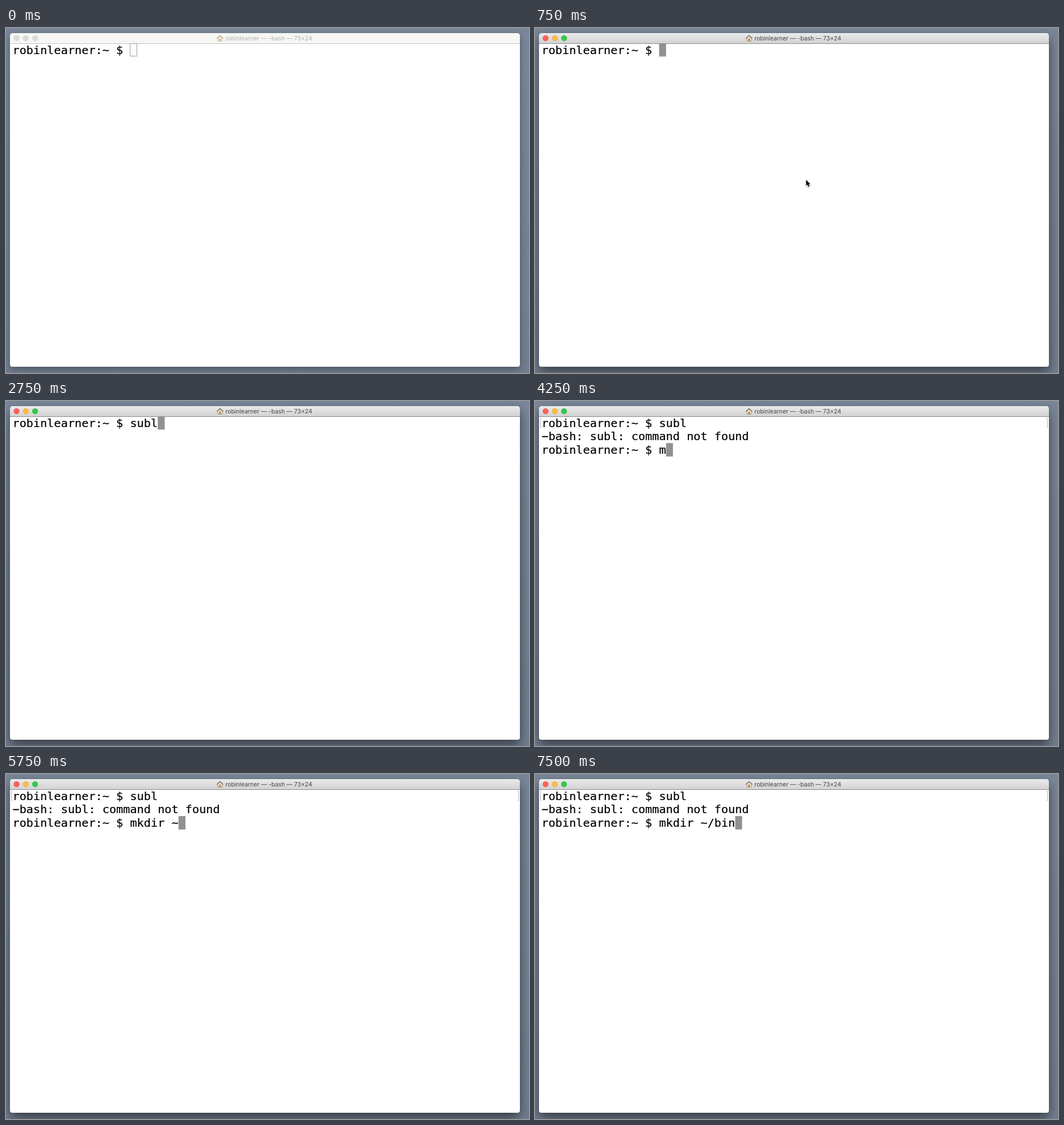
Recreate the animation shown at these times as an HTML page. Size 921 px wide and 608 px high, loop 8000 ms.

```html
<!DOCTYPE html>
<html lang="en">
<head>
<meta charset="utf-8">
<title>Terminal session</title>
<style>
  html, body { margin: 0; width: 100%; height: 100%; overflow: hidden; }
  body { background: linear-gradient(#7a8799, #727e90); }
  #stage { position: relative; width: 921px; height: 608px; overflow: hidden; }
  #window {
    position: absolute; left: 7px; top: 9px; width: 898px; height: 588px;
    border-radius: 5px 5px 4px 4px; background: #fff;
    box-shadow: 0 0 1px rgba(0, 0, 0, .4), 0 9px 20px rgba(0, 0, 0, .52);
  }
  #bar {
    height: 18px; border-bottom: 1px solid #8c8c8c; border-radius: 5px 5px 0 0;
    background: linear-gradient(#f2f2f2, #e8e8e8 10%, #d2d2d2);
  }
  svg { position: absolute; left: 0; top: 0; }
  #title { font: 10.4px Inter, "Liberation Sans", sans-serif; fill: #454545; }
  #screen text {
    font: 20.23px "DejaVu Sans Mono", monospace; white-space: pre;
    fill: #000; stroke: #000; stroke-width: .2px;
  }
  #caret { fill: #919191; }
  #brackets { fill: none; stroke: #b5b5b5; }

  .inactive #window { box-shadow: 0 0 1px rgba(0, 0, 0, .35), 0 5px 13px rgba(0, 0, 0, .33); }
  .inactive #bar { background: #f6f6f3; border-color: #c4c4c4; }
  .inactive #lights circle { fill: #dbdbdb; stroke: #cfcfcf; }
  .inactive #title { fill: #b1b1b1; }
  .inactive #house { opacity: .55; }
  .inactive #caret { fill: #fff; stroke: #9c9c9c; }
</style>
</head>
<body>
<div id="stage" class="inactive">
  <div id="window"><div id="bar"></div></div>
  <svg width="921" height="608" viewBox="0 0 921 608">
    <g id="lights" stroke-width=".6">
      <circle cx="18.6" cy="18" r="4.8" fill="#fc605b" stroke="#df4844"/>
      <circle cx="34.9" cy="18" r="4.8" fill="#fdbd41" stroke="#dea036"/>
      <circle cx="51.2" cy="18" r="4.8" fill="#34c84a" stroke="#27aa35"/>
    </g>
    <g id="house">
      <path d="M373 18L377 14.5 381 18V23.2H373Z" fill="#f0e6d3" stroke="#8f8577" stroke-width=".8"/>
      <path d="M371.3 18.5L377 13.2 382.7 18.5" fill="none" stroke="#807468" stroke-width="1.4"/>
      <path d="M375.6 18.6h2.8v4.4h-2.8z" fill="#b9782f"/>
    </g>
    <text id="title" x="386.5" y="22"></text>
    <g id="screen">
      <rect id="caret"/>
      <text x="11.5" y="45.7"></text>
      <text x="11.5" y="69.3"></text>
      <text x="11.5" y="92.9"></text>
      <path id="brackets" d="M11.5 30.5H9.5V46.5H11.5M900.5 30.5H902.5V46.5H900.5"/>
    </g>
    <g id="pointer" style="filter: drop-shadow(0 1px 1px rgba(0,0,0,.35))">
      <path d="M0 0V10.6L2.4 8.4 4 12.2 5.9 11.4 4.3 7.7H7.5Z" stroke="#fff" stroke-width="1.6"
            stroke-linejoin="round" paint-order="stroke"/>
    </g>
  </svg>
</div>
<script>
  const LOOP = 8000, CELL = 12.18, ROW = 23.6;
  const USER = 'robinlearner';
  const PROMPT = USER + ':~ $ ';
  const ACTIVE_AT = 750, RETURN_AT = 3250;

  // Each entry: time in ms, text typed so far on the line
  const FIRST = [[1750, 's'], [2000, 'su'], [2250, 'sub'], [2750, 'subl']];
  const SECOND = [
    [4250, 'm'], [4500, 'mk'], [4750, 'mkd'], [5000, 'mkdi'], [5250, 'mkdir '],
    [5750, 'mkdir ~'], [6750, 'mkdir ~/'], [7000, 'mkdir ~/bi'], [7250, 'mkdir ~/bin']
  ];

  const el = id => document.getElementById(id);
  const stage = el('stage'), caret = el('caret'), pointer = el('pointer');
  const rows = [...document.querySelectorAll('#screen text')];
  const show = (node, on) => node.setAttribute('visibility', on ? 'visible' : 'hidden');
  const typed = (keys, t) => keys.reduce((text, [at, next]) => t >= at ? next : text, '');

  function setAttrs(node, attrs) {
    for (const name in attrs) node.setAttribute(name, attrs[name]);
  }

  function drawCaret(line, row, active) {
    const x = 11.5 + line.length * CELL, y = 27 + row * ROW;
    setAttrs(caret, active
      ? { x, y: Math.max(y, 28), width: CELL, height: row ? ROW : 22.3 }
      : { x: 218.5, y: 27.5, width: 12, height: 22 });
  }

  function draw(t) {
    const active = t >= ACTIVE_AT, returned = t >= RETURN_AT;
    const first = PROMPT + typed(FIRST, t);
    const second = PROMPT + typed(SECOND, t);
    stage.classList.toggle('inactive', !active);

    rows[0].textContent = first;
    rows[1].textContent = returned ? '\u2212bash: subl: command not found' : '';
    rows[2].textContent = returned ? second : '';
    show(el('brackets'), returned);
    drawCaret(returned ? second : first, returned ? 2 : 0, active);

    show(pointer, t >= 500 && t < 1000);
    pointer.setAttribute('transform', active ? 'translate(477.5 267.5)' : 'translate(486.5 261.5)');
  }

  function tick() {
    draw(performance.now() % LOOP);
    requestAnimationFrame(tick);
  }

  el('title').textContent = USER + ' — -bash — 73×24';
  tick();
</script>
</body>
</html>
```
